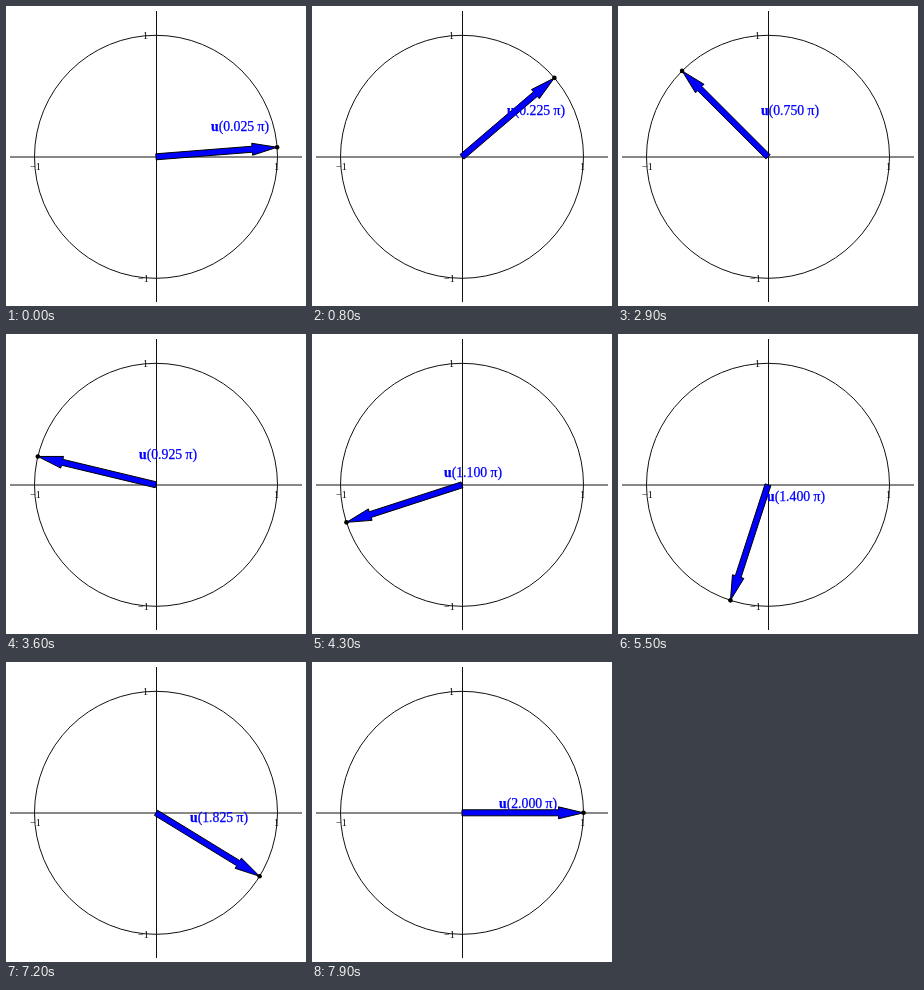
Recreate the animation shown at these times as an HTML page. Size 300x300 px, loop 8000 ms.

```html
<!DOCTYPE html>
<html lang="en">
<head>
<meta charset="utf-8">
<title>Unit vector on a circle</title>
<style>
  html, body { margin: 0; width: 100%; height: 100%; overflow: hidden; background: #fff; }
  svg { display: block; width: 100vw; height: 100vh; }
  .line { fill: none; stroke: #111; stroke-width: 1; }
  text { font-family: "Liberation Serif", "Times New Roman", serif; white-space: pre; }
  .tick { font-size: 10px; }
  #label { font-size: 13.75px; fill: #00f; stroke: #00f; stroke-width: .25; }
  #name { font-weight: bold; }
  #arrow { fill: #00f; stroke: #000; stroke-width: 1; }
</style>
</head>
<body>
<svg viewBox="0 0 300 300">
  <path class="line" d="M4 151H296M150.5 5V296"/>
  <circle class="line" cx="150" cy="150.8" r="121.5"/>
  <g class="tick">
    <text x="137" y="33">1</text>
    <text x="132" y="276">−1</text>
    <text x="24" y="164">−1</text>
    <text x="268" y="164">1</text>
  </g>
  <path id="arrow"/>
  <circle id="dot" r="2.3"/>
  <text id="label"><tspan id="name">u</tspan><tspan id="value"></tspan></text>
</svg>
<script>
const STEPS = 80, STEP_MS = 100;
const CX = 150, CY = 150.8, R = 121.5;
const HEAD = 25, HEAD_W = 6, SHAFT_W = 3;
const [arrow, dot, label, value] =
  ["arrow", "dot", "label", "value"].map(id => document.getElementById(id));

function arrowPath(c, s) {
  const at = (along, side) =>
    (CX + along * c - side * s).toFixed(2) + " " + (CY - along * s - side * c).toFixed(2);
  const neck = R - HEAD;
  return "M" + [
    at(0, SHAFT_W), at(neck, SHAFT_W), at(neck, HEAD_W), at(R, 0),
    at(neck, -HEAD_W), at(neck, -SHAFT_W), at(0, -SHAFT_W)
  ].join("L") + "Z";
}

// The label circles with the arrow while drifting left and down.
function labelPlace(t, c, s) {
  const x = 50.8 + 32.4 * c - 9.1 * t + 0.7 * (2 * c * c - 1);
  const y = 29 + 31.4 * s - 2 * c - 9 * t;
  return [Math.round(121.5 + x), Math.round(154.5 - y)];
}

function draw(step) {
  const t = (step + 1) / 40;
  const c = Math.cos(t * Math.PI), s = Math.sin(t * Math.PI);
  arrow.setAttribute("d", arrowPath(c, s));
  dot.setAttribute("cx", CX + R * c);
  dot.setAttribute("cy", CY - R * s);
  const [x, y] = labelPlace(t, c, s);
  label.setAttribute("x", x);
  label.setAttribute("y", y);
  value.textContent = `(${t.toFixed(3)} π)`;
}

let start = null, shown = -1;
function tick() {
  const now = performance.now();
  start ??= now;
  const step = Math.floor((now - start) / STEP_MS) % STEPS;
  if (step !== shown) draw(shown = step);
  requestAnimationFrame(tick);
}
tick();
</script>
</body>
</html>
```
